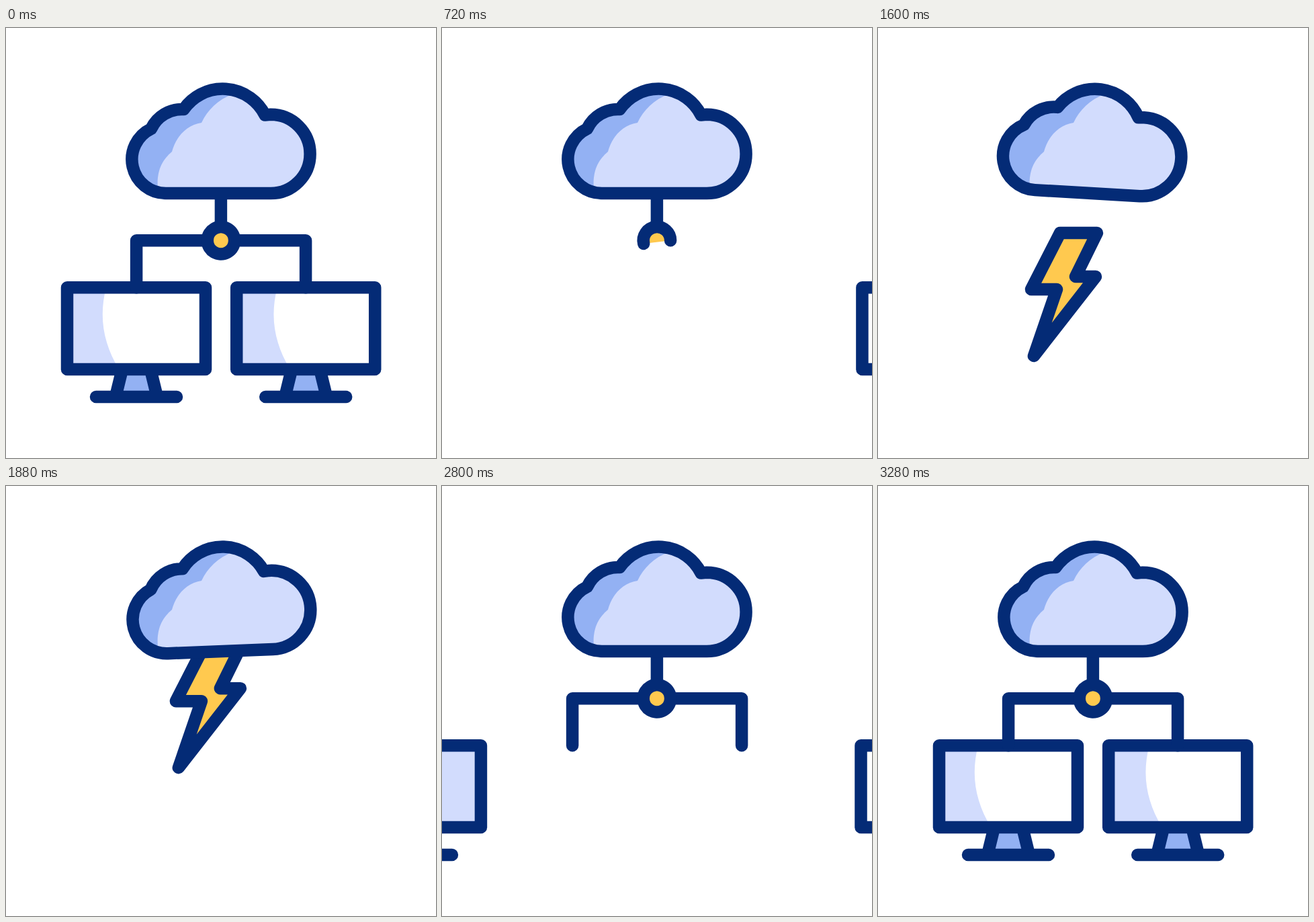
An HTML page that plays this animation: 640 by 640 pixels, repeating every 3.72 s.

```html
<!DOCTYPE html>
<html lang="en">
<head>
<meta charset="utf-8">
<title>Cloud network</title>
<style>
  html, body { margin: 0; width: 100%; height: 100%; overflow: hidden; background: #fff; }
  svg { display: block; width: 100%; height: 100%; }
  .line { fill: none; stroke: #042b76; stroke-width: 18.5; stroke-linecap: round; stroke-linejoin: round; }
</style>
</head>
<body>
<svg viewBox="0 0 640 640">
  <defs>
    <path id="cloudShape" d="M238 246 A50.5 50.5 0 0 1 216 150 A50.5 50.5 0 0 1 264.5 121 A70.5 70.5 0 0 1 385.5 129.5 L394 128.8 A58 58 0 0 1 394 246 Z"/>
    <clipPath id="cloudClip"><use href="#cloudShape"/></clipPath>
    <clipPath id="leftClip"><rect id="leftScreen" x="91" y="386" width="206" height="122"/></clipPath>
    <clipPath id="rightClip"><rect id="rightScreen" x="343" y="386" width="206" height="122"/></clipPath>
    <clipPath id="belowCloud"><rect y="190" width="640" height="450"/></clipPath>
    <path id="shine" d="M-400 386 H149 C137.5 432 145.5 470 168 508 H-400 Z" fill="#d2dcfd"/>
    <g id="monitor">
      <path d="M173 508 L163 549 H225 L215 508 Z" fill="#93b1f3"/>
      <path class="line" d="M91 386.2 H297 V508 H91 Z M173 508 L163 549 M215 508 L225 549 M134 549 H254"/>
    </g>
  </defs>

  <g clip-path="url(#leftClip)"><use href="#shine"/></g>
  <g clip-path="url(#rightClip)"><use href="#shine" x="254.7"/></g>
  <use id="left" href="#monitor"/>
  <use id="right" href="#monitor"/>
  <path id="leftWire" class="line"/>
  <path id="rightWire" class="line"/>
  <path id="stem" class="line"/>
  <path id="hub" class="line" style="fill:#ffc94f"/>

  <g id="boltClip">
    <path id="bolt" class="line" style="fill:#ffc94f"
      d="M271 305 H326 L294 370 H324 L232 488 L266 389 H228 Z"/>
  </g>

  <g clip-path="url(#cloudClip)">
    <use href="#cloudShape" fill="#93b1f3"/>
    <path fill="#d2dcfd" d="M227 250 C222 215 231 198 247 184 C253 161 270 144 291 141 C300 122 315 107 338 98 V60 H480 V260 H227 Z"/>
  </g>
  <use id="cloud" href="#cloudShape" class="line"/>
</svg>
<script>
const LOOP = 3720, STEP = 40, HUB_X = 319.9, HUB_Y = 316.3, HUB_R = 20.2;
const el = Object.fromEntries([...document.querySelectorAll('[id]')].map(e => [e.id, e]));

const progress = (t, from, to) => Math.min(1, Math.max(0, (t - from) / (to - from)));
const smooth = (t, from, to) => {
  const u = progress(t, from, to);
  return u * u * (3 - 2 * u);
};
// 1 while shown, easing to 0 over the first span and back to 1 over the second
const shown = (t, outFrom, outTo, inFrom, inTo) =>
  1 - smooth(t, outFrom, outTo) + smooth(t, inFrom, inTo);

// time and angle of each turning point of the cloud
const SWAY = [[1120, 0], [1280, -5.2], [1535, 5], [1785, -5], [2045, 4], [2220, 0]];
const swayAngle = t => SWAY.slice(1).reduce((angle, [time, value], i) =>
  angle + (value - SWAY[i][1]) * smooth(t, SWAY[i][0], time), 0);

function drawPath(node, visible, d) {
  node.style.display = visible ? '' : 'none';
  if (visible) node.setAttribute('d', d);
}

function drawWire(node, side, amount) {
  const startX = HUB_X + side * HUB_R;
  const cornerX = 320.1 + side * 126;
  const across = Math.abs(cornerX - startX);
  const length = amount * (across + 70);
  const d = `M${startX} ${HUB_Y} h${side * Math.min(length, across)}` +
    (length > across ? ` v${length - across}` : '');
  drawPath(node, amount > 0.001, d);
}

function drawHub(amount) {
  const sweep = Math.min(amount * 360, 359.9);
  const a = -sweep * Math.PI / 180;
  const x = HUB_X + HUB_R * Math.cos(a), y = HUB_Y + HUB_R * Math.sin(a);
  drawPath(el.hub, amount > 0.001,
    `M${HUB_X + HUB_R} ${HUB_Y} A${HUB_R} ${HUB_R} 0 ${sweep > 180 ? 1 : 0} 0 ${x} ${y}`);
}

function drawBolt(t) {
  const leaving = t >= 1700;
  const away = leaving ? smooth(t, 1700, 2220) : (1 - progress(t, 1040, 1440)) ** 2;
  el.bolt.style.display = t >= 1040 && t < 2220 ? '' : 'none';
  el.bolt.setAttribute('transform', `translate(${90 * away} ${-249 * away})`);
  el.boltClip.setAttribute('clip-path', leaving ? 'url(#belowCloud)' : 'none');
}

function render(t) {
  const leftX = -330 * (1 - shown(t, 0, 760, 2572, 3232));
  const rightX = 320 * (1 - shown(t, 60, 900, 2660, 3296));
  el.left.setAttribute('x', leftX);
  el.leftScreen.setAttribute('x', 91 + leftX);
  el.right.setAttribute('x', 252.2 + rightX);
  el.rightScreen.setAttribute('x', 343.2 + rightX);

  drawWire(el.leftWire, -1, shown(t, 200, 640, 2360, 2680));
  drawWire(el.rightWire, 1, shown(t, 200, 640, 2335, 2660));
  drawHub(shown(t, 568, 888, 2260, 2520));

  const stem = shown(t, 840, 1040, 2140, 2280);
  drawPath(el.stem, stem > 0.001, `M${HUB_X} 246 v${50 * stem}`);

  drawBolt(t);
  el.cloud.setAttribute('transform', `rotate(${swayAngle(t)} 320 168.5)`);
}

function tick() {
  const t = Math.floor(performance.now() % LOOP / STEP) * STEP;
  render(t >= 3280 ? 3300 : t);
  requestAnimationFrame(tick);
}
tick();
</script>
</body>
</html>
```
